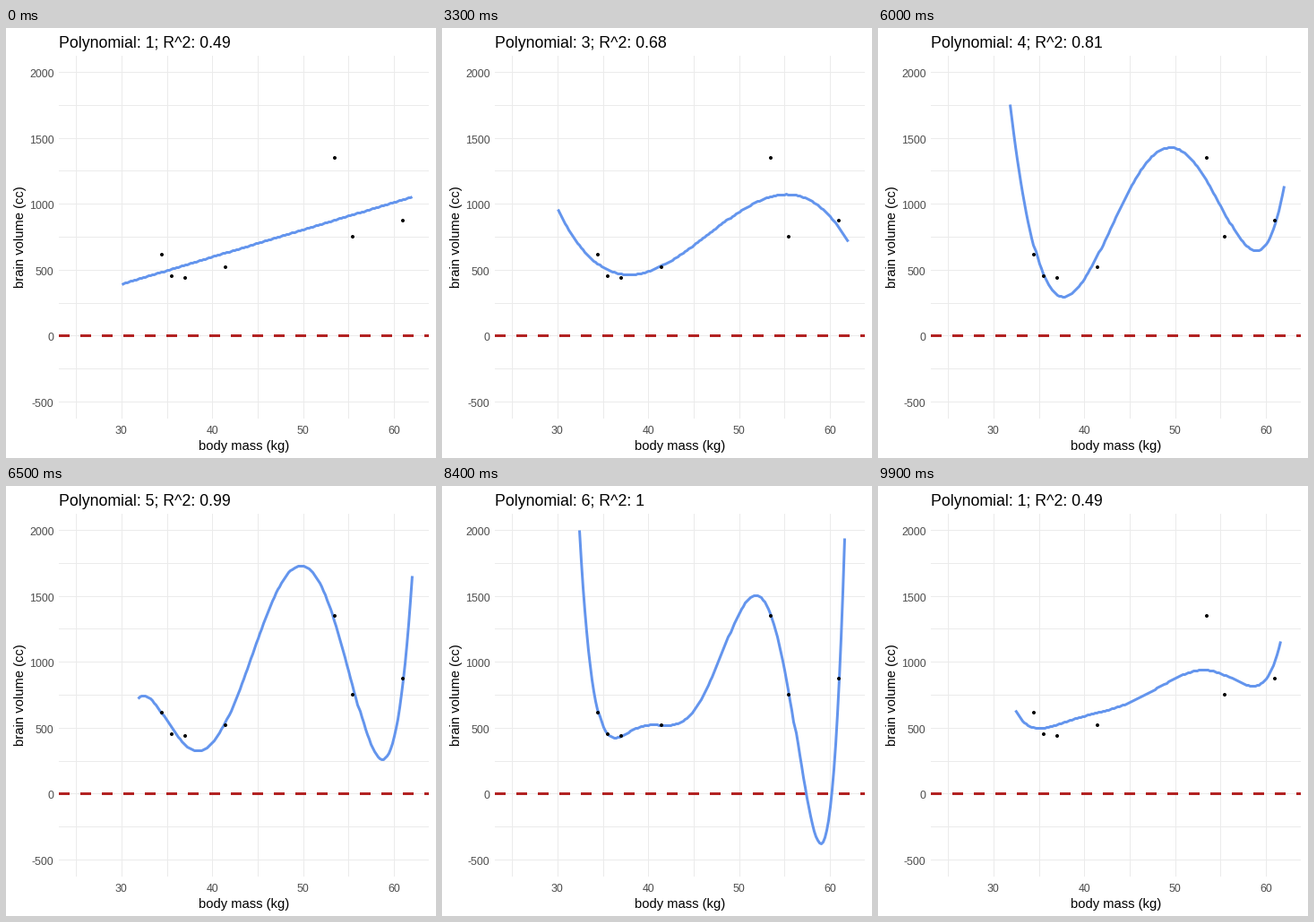
Animation of 480 by 480 pixels, one loop 10 s. Source, as a matplotlib script:

```python
import numpy as np
import matplotlib.pyplot as plt
from matplotlib.animation import FuncAnimation
from matplotlib.patches import Circle

SIZE, DPI = 480, 96
PX = 72 / DPI  # points per pixel
LEFT, RIGHT, TOP, BOTTOM = 59, 472, 31, 436
GRID, TICK = "#EBEBEB", "#4D4D4D"
STEPS, CYCLE, FRAMES = 8, 17, 100

mass = np.array([37.0, 35.5, 34.5, 41.5, 55.5, 61.0, 53.5])
brain = np.array([438, 452, 612, 521, 752, 871, 1350])
grid = np.linspace(30, 62, 161)


def px(x):
    return 128.86 + (np.asarray(x) - 30) * 10.14


def py(y):
    return 343.4 - np.asarray(y) * 0.1472


def snap(v):
    """Centre of the nearest whole pixel."""
    return np.round(v) + 0.5


def scaled(x):
    return (x - 45) / 10


def fit(degree):
    """Curve clipped to the y limits, and the title for one polynomial."""
    coef = np.polyfit(scaled(mass), brain, degree)
    residual = brain - np.polyval(coef, scaled(mass))
    r2 = 1 - residual.var() / brain.var()
    y = np.polyval(coef, scaled(grid))
    y = np.where((y >= -500) & (y <= 2000), y, np.nan)
    return y, f"Polynomial: {degree}; R^2: {round(r2, 2):g}"


fits = [fit(d) for d in range(1, 7)]

plt.rcParams["font.family"] = "Liberation Sans"
fig = plt.figure(figsize=(SIZE / DPI, SIZE / DPI), dpi=DPI, facecolor="white")
ax = fig.add_axes([0, 0, 1, 1])
ax.set_xlim(0, SIZE)
ax.set_ylim(SIZE, 0)
ax.axis("off")


def rule(xs, ys, color=GRID, width=1, **kw):
    return ax.plot(xs, ys, color=color, lw=width * PX, snap=False,
                   solid_capstyle="butt", **kw)[0]


def label(x, y, text, size, color="black", **kw):
    return ax.text(x, y, text, fontsize=size * PX, color=color,
                   va="baseline", **kw)


for x in range(25, 61, 5):
    rule([snap(px(x))] * 2, [TOP, BOTTOM])
for y in range(-500, 2001, 250):
    rule([LEFT, RIGHT], [snap(py(y))] * 2)

for x in range(30, 61, 10):
    label(px(x), 453, str(x), 12.4, TICK, ha="center")
for y in range(-500, 2001, 500):
    label(53.5, snap(py(y)) + 5.5, str(y), 12.4, TICK, ha="right")

label((LEFT + RIGHT) / 2, 471, "body mass (kg)", 14.75, ha="center")
label(20, (TOP + BOTTOM) / 2 - 0.5, "brain volume (cc)", 14.8, ha="center",
      rotation=90, rotation_mode="anchor")
title = label(58.8, 22, "", 17.75, ha="left")

rule([LEFT, RIGHT], [snap(py(0))] * 2, "#B22222", 3,
     linestyle=(0, (4, 4)), dash_capstyle="butt")
curve = rule([], [], "#6495ED", 3, solid_joinstyle="round")
for x, y in zip(px(mass), py(brain)):
    ax.add_patch(Circle((round(x), round(y)), 2, color="black", lw=0,
                        snap=False, zorder=3))


def draw(frame):
    # the last hold is one frame shorter than the others
    tick = frame + 8 + (frame >= 93)
    state, step = divmod(tick, CYCLE)
    t = min((step + 1) / STEPS, 1)
    y0, title0 = fits[(state - 1) % 6]
    y1, title1 = fits[state % 6]
    # while moving, only the part both curves share is visible
    y = y1 if t == 1 else y0 + (y1 - y0) * t
    curve.set_data(snap(px(grid)), snap(py(y)))
    title.set_text(title1 if t >= 0.5 else title0)
    return curve, title


anim = FuncAnimation(fig, draw, frames=FRAMES, interval=100,
                     repeat=True, repeat_delay=0, blit=False)
plt.show()
```
